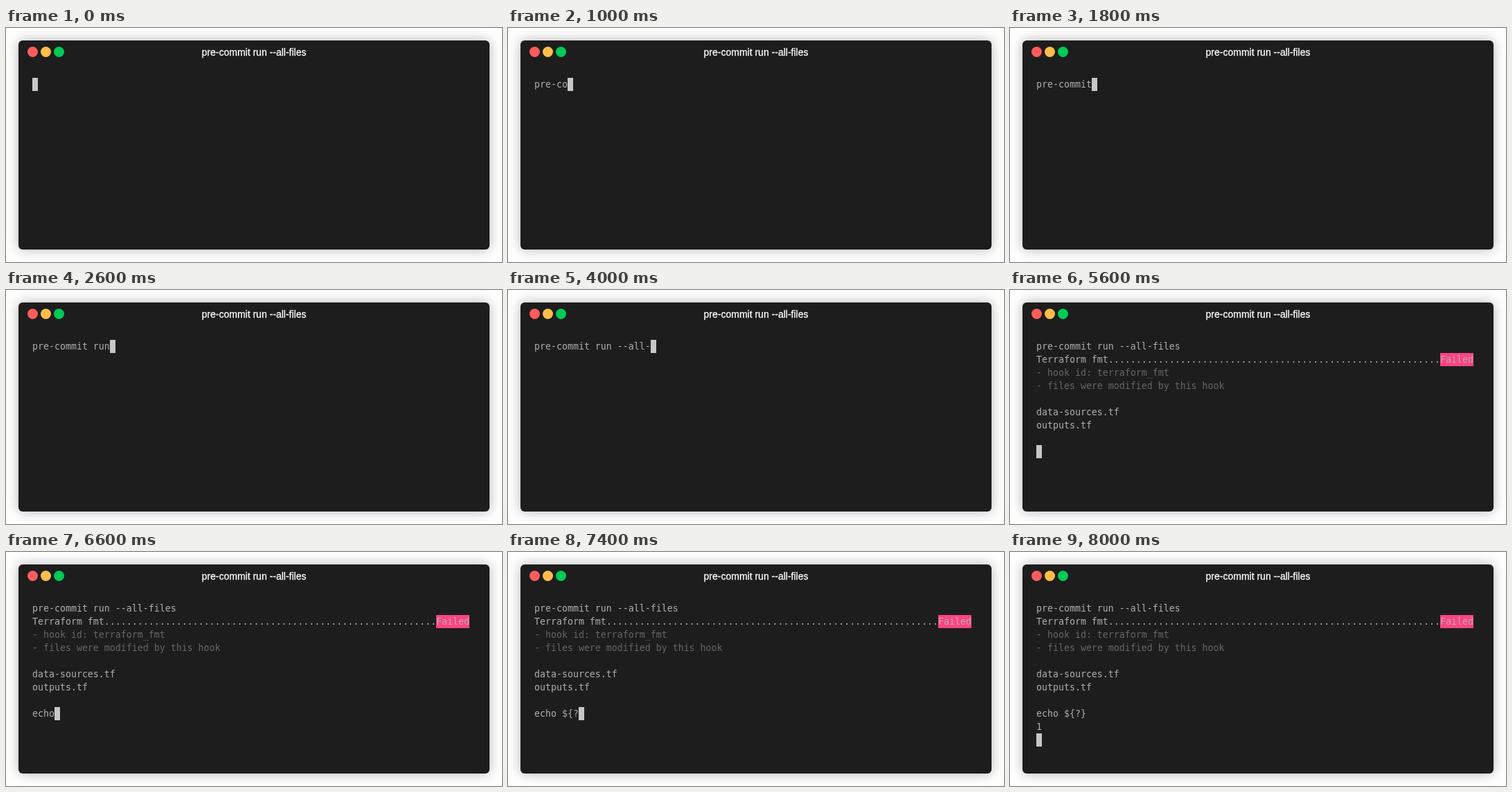
An HTML page that plays this animation: 716 px wide and 338 px high, repeating every 8200 ms.

```html
<!DOCTYPE html>
<html lang="en">
<head>
<meta charset="utf-8">
<title>Terminal</title>
<style>
  html, body { margin: 0; width: 100%; height: 100%; overflow: hidden; background: #fff; }
  .window {
    position: absolute; left: 18px; top: 18px; width: 680px; height: 302px;
    border-radius: 6px; background: #1d1d1d; box-shadow: 0 0 18px rgba(0, 0, 0, .3);
  }
  .dot { position: absolute; top: 9px; width: 15px; height: 15px; border-radius: 50%; }
  .title {
    position: absolute; top: 7px; width: 100%; text-align: center; color: #fff;
    font: 14px/20px "Liberation Sans", Arial, sans-serif; -webkit-text-stroke: .3px #fff;
  }
  pre {
    position: absolute; left: 20px; top: 54px; margin: 0; color: #afafaf;
    font: 13.288px/19px "DejaVu Sans Mono", monospace;
  }
  .dim { color: #666; }
  .failed, .cursor { display: inline-block; height: 19px; vertical-align: top; }
  .failed { background: #fc4384; }
  .cursor { width: 8px; background: #c7c7c7; }
</style>
</head>
<body>
<div class="window">
  <div class="dot" style="left: 13px; background: #ff5c5c"></div>
  <div class="dot" style="left: 32px; background: #ffbd4c"></div>
  <div class="dot" style="left: 51px; background: #00ca56"></div>
  <div class="title">pre-commit run --all-files</div>
  <pre id="screen"></pre>
</div>
<script>
const STEP = 200, LOOP = 8200;
const run = 'pre-commit run --all-files', echo = 'echo ${?}';
const hook = 'Terraform fmt' + '.'.repeat(60);
const report = '<span class="failed">Failed</span>\n' +
  '<span class="dim">- hook id: terraform_fmt\n- files were modified by this hook</span>\n\n' +
  'data-sources.tf\noutputs.tf\n\n';
const cursor = '<span class="cursor"></span>';
const screen = document.getElementById('screen');

// One key per step; output arrives in whole chunks.
function content(step) {
  let out = run.slice(0, step && step + 1);
  if (step >= 26) out += '\n';
  if (step >= 27) out += hook;
  if (step >= 28) out += report;
  if (step >= 30) out += echo.slice(0, step - 29);
  if (step >= 39) out += '\n';
  if (step >= 40) out += '1\n';
  return out + cursor;
}

let shown = -1;
const start = performance.now();
function draw() {
  const step = Math.floor((performance.now() - start) % LOOP / STEP);
  if (step !== shown) screen.innerHTML = content(shown = step);
  requestAnimationFrame(draw);
}
draw();
</script>
</body>
</html>
```
